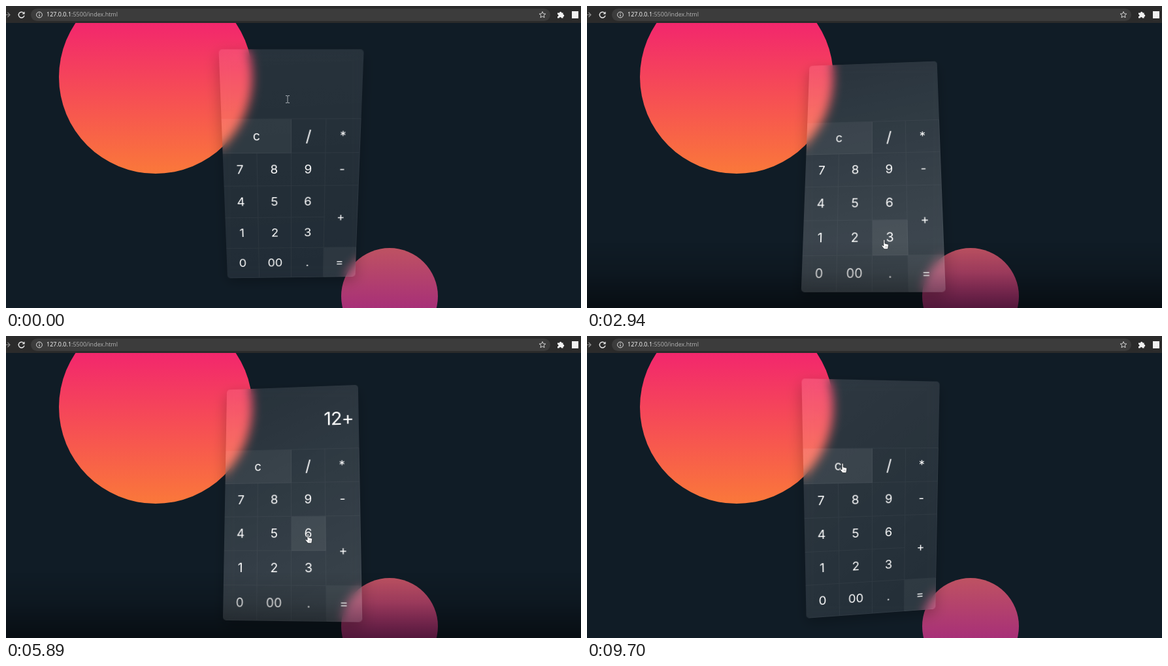
Animation of 880x463 px, one loop 9760 ms. Source, as an HTML page:

```html
<!DOCTYPE html>
<html lang="en">
<head>
<meta charset="utf-8">
<title>Glass calculator</title>
<style>
  html, body { margin: 0; width: 100%; height: 100%; overflow: hidden; background: #101c26; }
  #stage { position: absolute; left: 0; top: 0; width: 880px; height: 463px; overflow: hidden; background: #101c26; }
  #stage > * { position: absolute; }
  .ball { border-radius: 50%; }
  .big { left: 80.5px; top: -39px; width: 296px; height: 296px; background: linear-gradient(#f0107b, #fa783a); }
  .small { left: 513px; top: 371px; width: 148px; height: 148px; background: linear-gradient(#be5262, #9a1b85); }

  #calc {
    left: 333px; top: 72px; width: 208px; height: 361px;
    display: grid; grid-template: 101px repeat(5, 52px) / repeat(4, 52px);
    border-radius: 5px; overflow: hidden;
    background: rgba(255, 255, 255, .06);
    box-shadow: 0 8px 22px rgba(0, 0, 0, .25);
    -webkit-backdrop-filter: blur(8px); backdrop-filter: blur(8px);
    font: 400 19px Inter, sans-serif; color: #fff;
  }
  #calc > span {
    display: flex; align-items: center; justify-content: center; box-sizing: border-box;
    border-right: 1px solid rgba(255, 255, 255, .045);
    border-bottom: 1px solid rgba(255, 255, 255, .045);
  }
  #calc > #out {
    grid-column: span 4; justify-content: flex-end; padding: 4px 8px 0 0;
    font-size: 29px; letter-spacing: -1px; border-right: 0;
  }
  #glare {
    position: absolute; left: -257px; top: -180.5px; width: 722px; height: 722px;
    background: linear-gradient(0deg, rgba(255, 255, 255, 0), #fff);
  }

  #shade {
    left: 0; top: 363px; width: 880px; height: 100px;
    background: linear-gradient(transparent, rgba(0, 0, 0, .14) 45%, rgba(0, 0, 0, .5));
  }
  #bar { left: 0; top: 0; width: 880px; height: 26px; background: #2b2b2b; }
  #bar svg { position: absolute; left: 0; top: 0; }
  #url {
    position: absolute; left: 38px; top: 4px; width: 771px; height: 19px; padding-left: 24px;
    border-radius: 10px; background: #3c3c3c; color: #b4b4b4;
    font: 9px/18px "Open Sans", sans-serif; white-space: pre;
  }
  #url b { font-weight: 400; color: #fff; }
  #hand, #beam { left: 0; top: 0; overflow: visible; }
</style>
</head>
<body>
<div id="stage">
  <div class="ball big"></div>
  <div class="ball small"></div>
  <div id="calc"><span id="out"></span></div>
  <div id="shade"></div>
  <div id="bar">
    <div id="url"><b>127.0.0.1</b>:5500/index.html</div>
    <svg width="880" height="26" fill="none" stroke="#e4e4e4" stroke-width="1.2">
      <path d="M0 13.5H6M2.5 10L6 13.5L2.5 17" stroke="#8a8a8a"/>
      <path d="M27 10.6A4.4 4.4 0 1 0 28 14.6" stroke-width="1.5"/>
      <path d="M28.6 8.4V12.6H24.4Z" fill="#e4e4e4" stroke="none"/>
      <circle cx="51" cy="13.5" r="4.4" stroke-width="1"/>
      <path d="M51 13V16M51 10.8V12" stroke-width="1.1"/>
      <path d="M821 8.6L822.4 11.8L825.8 12.1L823.2 14.3L824 17.7L821 15.9L818 17.7L818.8 14.3L816.2 12.1L819.6 11.8Z" stroke-width=".9"/>
      <path d="M844 10.5H847A1.7 1.7 0 0 1 850.4 10.5H852.6V13A1.7 1.7 0 0 1 852.6 16.4V18.6H850A1.7 1.7 0 0 0 846.6 18.6H844V16A1.6 1.6 0 0 0 844 12.8Z" fill="#f1f1f1" stroke="none"/>
      <rect x="866" y="8" width="10" height="11" fill="#f1f1f1" stroke="none"/>
    </svg>
  </div>
  <svg id="hand" width="12" height="17">
    <path d="M3 1.2C3 -.4 5.2 -.4 5.2 1.2V6L9.2 7C10.5 7.3 10.8 8 10.7 9L10 13.2Q9.8 14.8 8.4 14.8H5Q4 14.8 3.3 13.8L.4 10.2C-.4 9.1 1 8.2 1.8 9L3 10Z" fill="#fff" stroke="#1c2128" stroke-width=".8"/>
    <path d="M6.2 10V12.6M8 10V12.6" stroke="#777" stroke-width=".6"/>
  </svg>
  <svg id="beam" width="8" height="12">
    <path d="M1 .5H3L4 1.3L5 .5H7M4 1.3V10.7M1 11.5H3L4 10.7L5 11.5H7" fill="none" stroke="#a9afb5"/>
  </svg>
</div>
<script>
const LOOP = 9760, MAX_TILT = 25, MAX_GLARE = .25;
const box = { x: 333, y: 72, w: 208, h: 361 };
const keysTop = box.y + 101;
const $ = id => document.getElementById(id);

// label, column, row, column span, row span
const keys = [['c', 0, 0, 2, 1], ['/', 2, 0], ['*', 3, 0], ['-', 3, 1], ['+', 3, 2, 1, 2],
  ['0', 0, 4], ['00', 1, 4], ['.', 2, 4], ['=', 3, 4]];
for (let n = 1; n <= 9; n++) keys.push([String(n), (n - 1) % 3, 3 - Math.floor((n - 1) / 3)]);

const cells = keys.map(([label, col, row, w = 1, h = 1]) => {
  const el = document.createElement('span');
  el.textContent = label;
  el.style.gridArea = `${row + 2} / ${col + 1} / span ${h} / span ${w}`;
  if (label === '/') el.style.fontSize = '24px';
  $('calc').append(el);
  const base = label === 'c' || label === '=' ? .05 : 0;
  return { el, base, x: box.x + col * 52, y: keysTop + row * 52, w: w * 52, h: h * 52 };
});
const glare = document.createElement('div');
glare.id = 'glare';
$('calc').append(glare);

// pointer stops: time, x, y
const path = [[0, 431, 143], [500, 452, 180], [1060, 526, 262], [1250, 526, 264], [1900, 500, 330],
  [2860, 456, 359], [3000, 454, 359], [3380, 362, 358], [3560, 362, 358], [3920, 411, 357],
  [4120, 411, 357], [4580, 503, 349], [4700, 504, 348], [4860, 512, 334], [5060, 512, 334],
  [5700, 462, 304], [6060, 462, 304], [6880, 516, 390], [7450, 515, 394], [8430, 417, 237],
  [8540, 416, 235], [9250, 391, 196], [9760, 391, 196]];
const screen = [[0, ''], [3470, '1'], [4030, '12'], [4920, '12+'], [5900, '12+6'], [7300, '18'], [9430, '']];
const shade = [[0, 0], [1700, 0], [2200, 1], [7500, 1], [8500, .3], [9000, 0], [9760, 0]];

const smooth = u => u * u * (3 - 2 * u);
const linear = u => u;

function at(track, t, ease) {
  let i = 1;
  while (i < track.length - 1 && track[i][0] < t) i++;
  const a = track[i - 1], b = track[i];
  const u = ease(Math.min(1, Math.max(0, (t - a[0]) / (b[0] - a[0]))));
  return a.slice(1).map((v, k) => v + (b[k + 1] - v) * u);
}
const pointer = t => at(path, Math.max(0, t), smooth);
const inside = (c, [x, y]) => x >= c.x && x < c.x + c.w && y >= c.y && y < c.y + c.h;

function draw(t) {
  const [px, py] = pointer(t);

  // recent pointer places give the tilt and hover their short lag
  const trail = Array.from({ length: 10 }, (_, i) => pointer(t - i * 18));
  const mean = k => trail.reduce((s, p) => s + p[k], 0) / trail.length;
  const dx = (mean(0) - box.x) / box.w - .5;
  const dy = (mean(1) - box.y) / box.h - .5;
  $('calc').style.transform =
    `perspective(735px) rotateX(${dy * 2 * MAX_TILT}deg) rotateY(${-dx * 2 * MAX_TILT}deg)`;
  glare.style.transform = `rotate(${Math.atan2(dx * box.w, -dy * box.h)}rad)`;
  glare.style.opacity = (dy + .5) * MAX_GLARE;

  for (const c of cells) {
    const hover = trail.filter(p => inside(c, p)).length / trail.length;
    c.el.style.background = `rgba(255, 255, 255, ${c.base + hover * (c.base ? .025 : .07)})`;
  }
  $('out').textContent = screen.filter(s => s[0] <= t).pop()[1];
  $('shade').style.opacity = at(shade, t, linear)[0];

  const typing = py < keysTop;
  $('beam').style.display = typing ? '' : 'none';
  $('hand').style.display = typing ? 'none' : '';
  $('beam').style.transform = `translate(${px - 4}px, ${py - 6}px)`;
  $('hand').style.transform = `translate(${px - 4}px, ${py - 1}px)`;
}

const start = performance.now();
function tick() {
  draw((performance.now() - start) % LOOP);
  requestAnimationFrame(tick);
}
draw(0);
requestAnimationFrame(tick);
</script>
</body>
</html>
```
